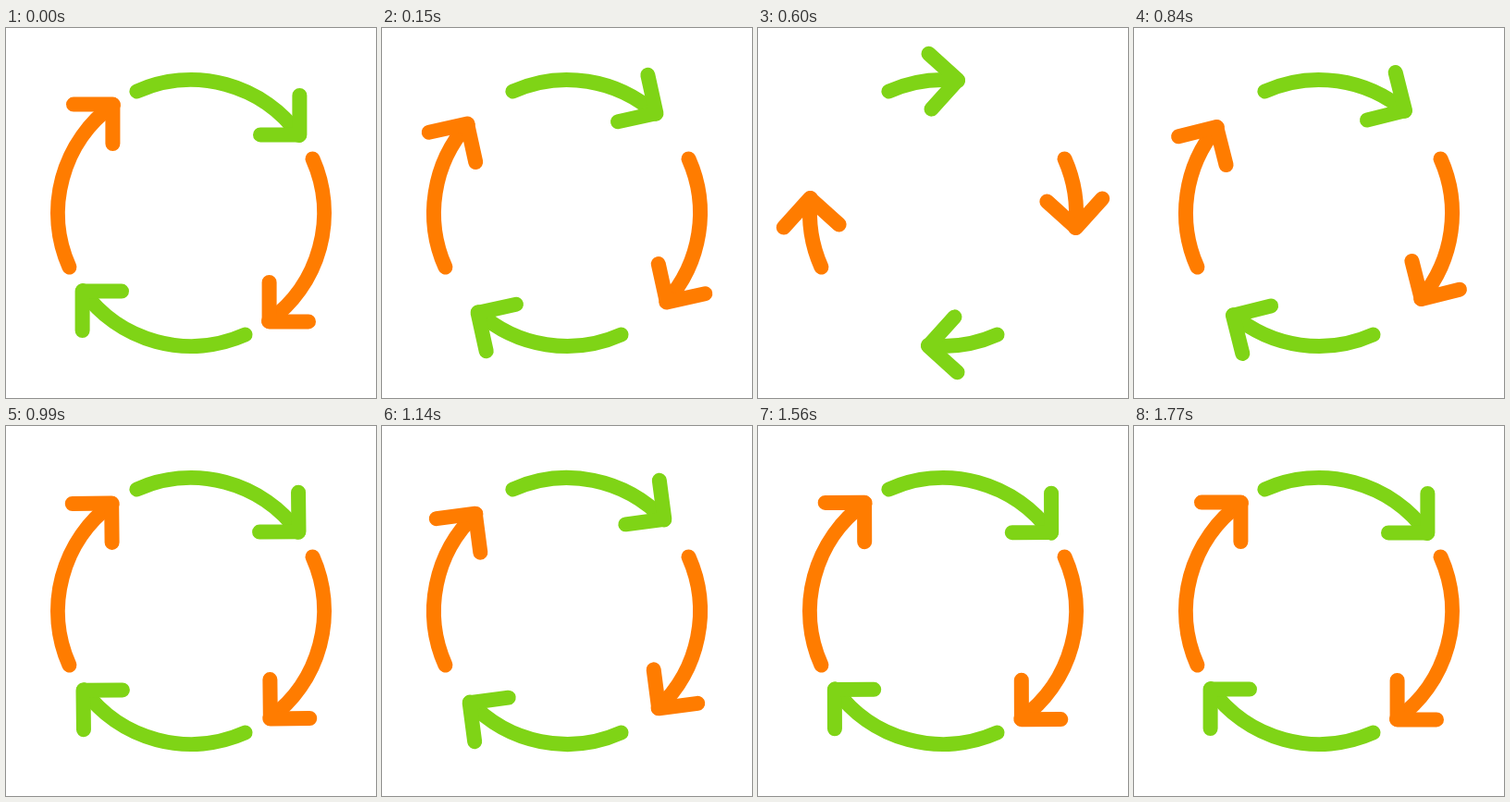
Animation of 400x400 px, one loop 2.33 s. Source, as an HTML page:

```html
<!DOCTYPE html>
<html lang="en">
<head>
<meta charset="utf-8">
<title>Cycle arrows</title>
<style>
  html, body { margin: 0; width: 100%; height: 100%; overflow: hidden; background: #fff; }
  svg { display: block; width: 100vw; height: 100vh; }
  path { fill: none; stroke-width: 16; stroke-linecap: round; stroke-linejoin: round; }
</style>
</head>
<body>
<svg viewBox="0 0 400 400"></svg>
<script>
const NS = 'http://www.w3.org/2000/svg';
const LOOP = 2330, STEP = 30, LAST = 1770;
const CENTER = 200, RADIUS = 144;
const TAIL = -24, TIP = 54.3; // degrees clockwise from the top
const COLORS = ['#7fd416', '#ff7c00'];

// Swing of the arrow heads around the centre: time, degrees, degrees per ms.
const KEYS = [
  [0, 0, 0],
  [480, -53.6, 0],
  [600, -47.9, 0.095],
  [840, -14.2, 0.15],
  [945, 2.5, 0],
  [1080, -9.5, 0],
  [1140, -7.5, 0.035],
  [1380, -1.4, 0.012],
  [1770, 0, 0]
];

const svg = document.querySelector('svg');

function add(parent, name, attributes) {
  const node = document.createElementNS(NS, name);
  for (const key in attributes) node.setAttribute(key, attributes[key]);
  return parent.appendChild(node);
}

const arrows = [0, 1, 2, 3].map(i => {
  const group = add(svg, 'g', {
    stroke: COLORS[i % 2],
    transform: `rotate(${i * 90} ${CENTER} ${CENTER})`
  });
  return {
    shaft: add(group, 'path', {}),
    head: add(group, 'path', { d: 'M317.4 73V115.4H275' })
  };
});

function swingAt(time) {
  const i = Math.max(1, KEYS.findIndex(key => key[0] >= time));
  const [t0, a, slopeA] = KEYS[i - 1];
  const [t1, b, slopeB] = KEYS[i];
  const span = t1 - t0, u = (time - t0) / span, v = 1 - u;
  return v * v * (1 + 2 * u) * a + u * u * (3 - 2 * u) * b
    + span * u * v * (v * slopeA - u * slopeB);
}

function point(degrees) {
  const angle = degrees * Math.PI / 180;
  const x = CENTER + RADIUS * Math.sin(angle);
  const y = CENTER - RADIUS * Math.cos(angle);
  return `${x.toFixed(3)} ${y.toFixed(3)}`;
}

function draw(time) {
  const swing = swingAt(Math.min(LAST, Math.floor(time / STEP) * STEP));
  const arc = `M${point(TAIL)}A${RADIUS} ${RADIUS} 0 0 1 ${point(TIP + swing)}`;
  for (const { shaft, head } of arrows) {
    shaft.setAttribute('d', arc);
    head.setAttribute('transform', `rotate(${swing} ${CENTER} ${CENTER})`);
  }
}

const start = performance.now();
function tick() {
  draw((performance.now() - start) % LOOP);
  requestAnimationFrame(tick);
}
draw(0);
requestAnimationFrame(tick);
</script>
</body>
</html>
```
